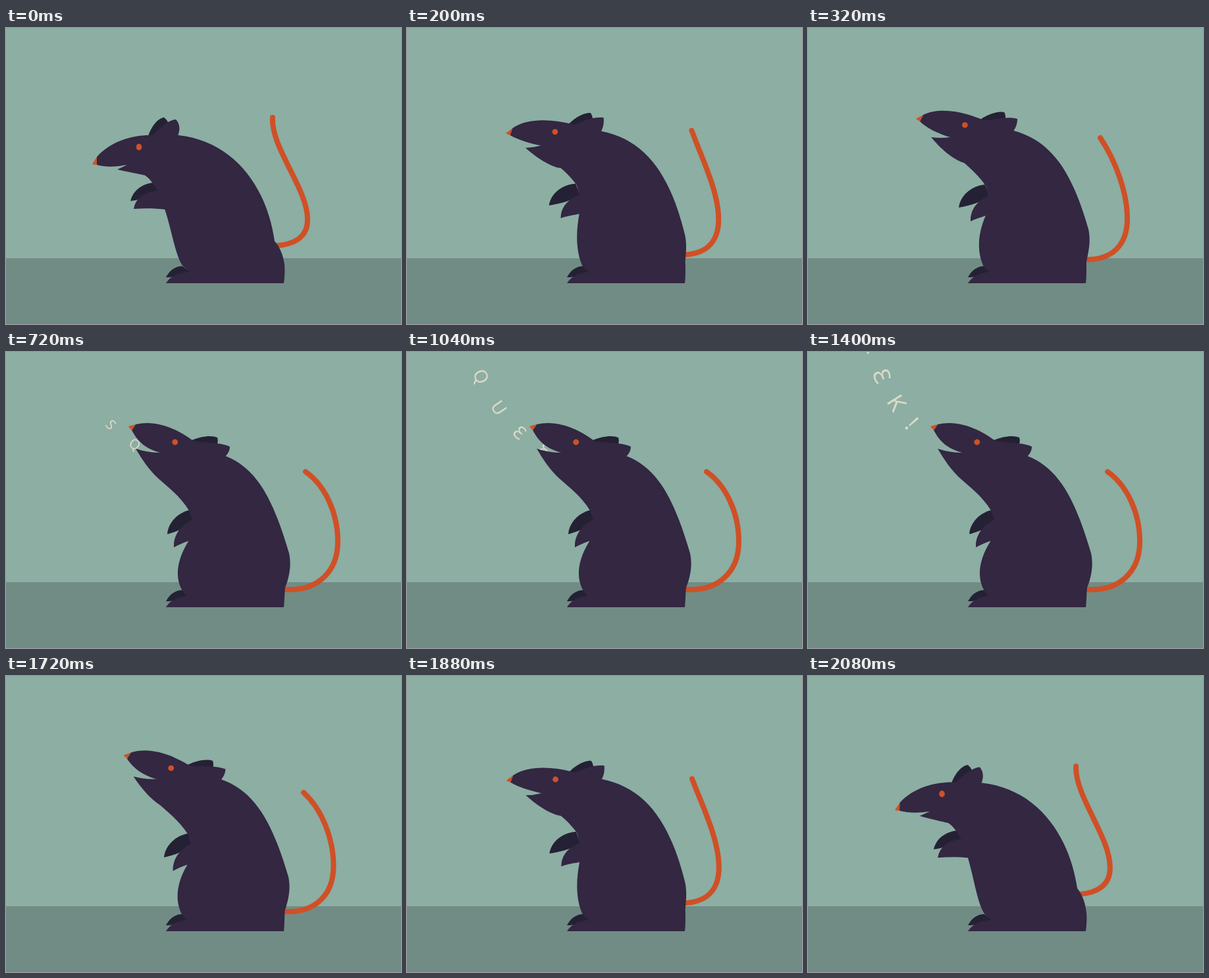
These frames come from a looping animation (600 px wide and 450 px high, 2120 ms). An HTML page:

```html
<!DOCTYPE html>
<html lang="en">
<head>
<meta charset="utf-8">
<title>Squeaking rat</title>
<style>
  html, body { margin: 0; width: 100%; height: 100%; overflow: hidden; background: #8caea3; }
  svg { display: block; width: 600px; height: 450px; }
  text { font: 500 28px "Noto Sans", "DejaVu Sans", sans-serif; fill: #ded8c8; text-anchor: middle; }
  .coat { fill: #332742; }
  .shade { fill: #252134; }
  .skin { fill: #cf5026; }
  #tail { fill: none; stroke: #cf5026; stroke-width: 8; stroke-linecap: round; }
</style>
</head>
<body>
<svg viewBox="0 0 600 450">
  <rect width="600" height="450" fill="#8caea3"/>
  <rect y="350" width="600" height="100" fill="#718c85"/>
  <path id="voice" fill="none" d="M234 160 C215 152 190 139 171 122 C152 105 133 79 113 38 C105 20 98 -15 90 -50"/>
  <g id="word"></g>
  <path id="tail"/>
  <path id="farEar" class="shade"/>
  <path id="farArm" class="shade"/>
  <path class="shade" d="M243 379 C248 369 257 362 268 362 L280 371 C266 373 258 379 243 379 Z"/>
  <path id="body" class="coat"/>
  <path id="nearEar" class="coat"/>
  <path id="nearArm" class="coat"/>
  <path id="nose" class="skin"/>
  <ellipse id="eye" class="skin"/>
</svg>
<script>
const LOOP = 2120, STEP = 40;
const RISE_END = 600, FALL_START = 1680, WORD_END = 1560;
const MID = 0.675; // progress of the middle pose
const $ = id => document.getElementById(id);

// Each part: crouched, half raised, raised.
const poses = {
  tail: [
    'M405 136 C402 182 459 245 458 292 C458 318 438 329 410 331',
    'M444 167 C466 200 485 248 485 290 C485 330 462 352 424 352',
    'M455 182 C485 203 504 245 504 288 C504 335 472 364 424 361'
  ],
  farEar: [
    'M216 164 C221 149 231 137 240 136 C243 138 245 141 247 145 L238 168 Z',
    'M262 139 C275 130 290 126 298 128 C300 131 300 134 300 138 L278 147 Z',
    'M282 134 C297 128 312 126 321 130 C322 133 322 136 321 140 L295 146 Z'
  ],
  nearEar: [
    'M221 164 C232 155 243 141 258 139 C264 145 265 154 261 164 L240 178 Z',
    'M266 141 C284 139 301 134 318 138 C318 147 315 152 312 157 L290 168 Z',
    'M283 135 C300 139 328 137 340 144 C340 150 337 155 333 159 L310 168 Z'
  ],
  farArm: [
    'M189 263 C193 246 208 237 223 235 L232 248 C216 255 203 262 189 263 Z',
    'M229 273 C231 255 248 240 269 238 L275 256 C262 265 250 269 229 273 Z',
    'M245 277 C246 260 260 245 279 240 L285 255 C270 269 262 272 245 277 Z'
  ],
  nearArm: [
    'M194 275 C197 258 211 248 234 247 L254 262 L243 276 C227 274 210 274 194 275 Z',
    'M247 294 C246 277 257 262 275 255 L287 270 L271 285 C262 288 255 290 247 294 Z',
    'M255 297 C254 278 266 263 284 254 L295 272 L278 287 C269 290 262 293 255 297 Z'
  ],
  nose: [
    'M131 207 L138 196 L138 208 Q134 208 131 207 Z',
    'M164 138 L175 132 L170 142 Q167 140 164 138 Z',
    'M186 113 L197 110 L191 119 Q188 116 186 113 Z'
  ],
  body: [
    'M243 388 C249 378 260 372 279 371 L268 361 C257 345 252 308 241 275 L231 247 L223 236 ' +
    'C219 231 216 227 211 224 C200 221 185 219 169 215 L184 208 C168 211 152 212 138 208 L138 196 ' +
    'C158 173 190 163 218 163 L262 163 C345 172 396 240 408 324 C416 333 421 345 423 360 ' +
    'C424 370 423 380 422 388 Z',
    'M243 388 C249 378 260 372 275 371 L267 363 C256 340 258 312 270 285 L274 256 L270 240 ' +
    'C262 228 250 216 237 205 C220 200 200 182 187 166 Q202 168 216 166 C198 161 180 152 170 142 L175 132 ' +
    'C200 120 235 127 264 139 L312 156 C372 172 402 222 426 306 C430 325 426 340 423 355 ' +
    'C423 368 423 380 422 388 Z',
    'M243 388 C249 378 260 372 274 371 L268 363 C257 345 258 318 277 288 L283 255 L278 241 ' +
    'C265 220 248 207 231 192 C218 180 207 164 197 147 Q215 153 234 153 C212 147 200 136 191 119 L197 110 ' +
    'C225 103 255 114 283 134 L333 158 C385 178 408 232 430 306 C434 325 430 343 424 358 ' +
    'C423 368 423 380 422 388 Z'
  ]
};
// The closed jaw's edge is straight: give it the same curve command as the open one.
poses.body[0] = poses.body[0].replace('L184 208', 'Q176 212 184 208');

const eyePoses = [[202, 181, 4.3, 5], [238.3, 147.5, 4.4, 4.3], [256.7, 137, 4.5, 4.4]];

const glyphs = [['S', 151], ['Q', 104], ['U', 49], ['Ɛ', 0], ['Ɛ', -46], ['K', -93], ['!', -132]];
const letters = glyphs.map(([char, offset]) => {
  const el = document.createElementNS('http://www.w3.org/2000/svg', 'text');
  el.textContent = char;
  $('word').append(el);
  return { el, offset };
});

// Quadratic blend passing through all three poses.
function blend(a, m, b, p) {
  return a * (p - MID) * (p - 1) / MID
    + m * p * (p - 1) / (MID * (MID - 1))
    + b * p * (p - MID) / (1 - MID);
}

const number = /-?\d+(\.\d+)?/g;
const paths = Object.entries(poses).map(([id, list]) => ({
  el: $(id), shape: list[2], values: list.map(d => d.match(number).map(Number))
}));

function bezier(x1, y1, x2, y2) {
  const at = (s, a, b) => 3 * s * (1 - s) ** 2 * a + 3 * s * s * (1 - s) * b + s ** 3;
  return x => {
    if (x <= 0 || x >= 1) return x <= 0 ? 0 : 1;
    let lo = 0, hi = 1;
    for (let i = 0; i < 24; i++) {
      const s = (lo + hi) / 2;
      if (at(s, x1, x2) < x) lo = s; else hi = s;
    }
    return at(lo, y1, y2);
  };
}
const rise = bezier(0.167, 0.167, 0.667, 1);
const fall = bezier(0.167, 0.167, 0.7, 0.97);

function drawRat(p) {
  for (const { el, shape, values: [a, m, b] } of paths) {
    let i = 0;
    el.setAttribute('d', shape.replace(number, () => {
      const v = blend(a[i], m[i], b[i], p);
      i++;
      return v.toFixed(2);
    }));
  }
  const [a, m, b] = eyePoses;
  ['cx', 'cy', 'rx', 'ry'].forEach((key, i) =>
    $('eye').setAttribute(key, blend(a[i], m[i], b[i], p)));
}

const voice = $('voice'), voiceLength = voice.getTotalLength();

function drawWord(t) {
  const size = 21 + (t - 720) * 0.0206;
  const head = 73.6 + 0.42 * (t - 1040);
  for (const { el, offset } of letters) {
    const d = head + offset;
    const shown = t >= RISE_END && t < WORD_END && d > 0 && d < voiceLength;
    el.style.display = shown ? '' : 'none';
    if (!shown) continue;
    const c = voice.getPointAtLength(d);
    const from = voice.getPointAtLength(d + 2), to = voice.getPointAtLength(Math.max(0, d - 2));
    const angle = Math.atan2(to.y - from.y, to.x - from.x) * 180 / Math.PI;
    el.style.fontSize = size + 'px';
    el.setAttribute('y', size * 0.357);
    el.setAttribute('transform', `translate(${c.x} ${c.y}) rotate(${angle})`);
  }
}

const start = performance.now();
function frame() {
  const t = Math.floor((performance.now() - start) % LOOP / STEP) * STEP;
  drawRat(t < FALL_START ? rise(t / RISE_END) : 1 - fall((t - FALL_START) / (LOOP - FALL_START)));
  drawWord(t);
  requestAnimationFrame(frame);
}
frame();
</script>
</body>
</html>
```
